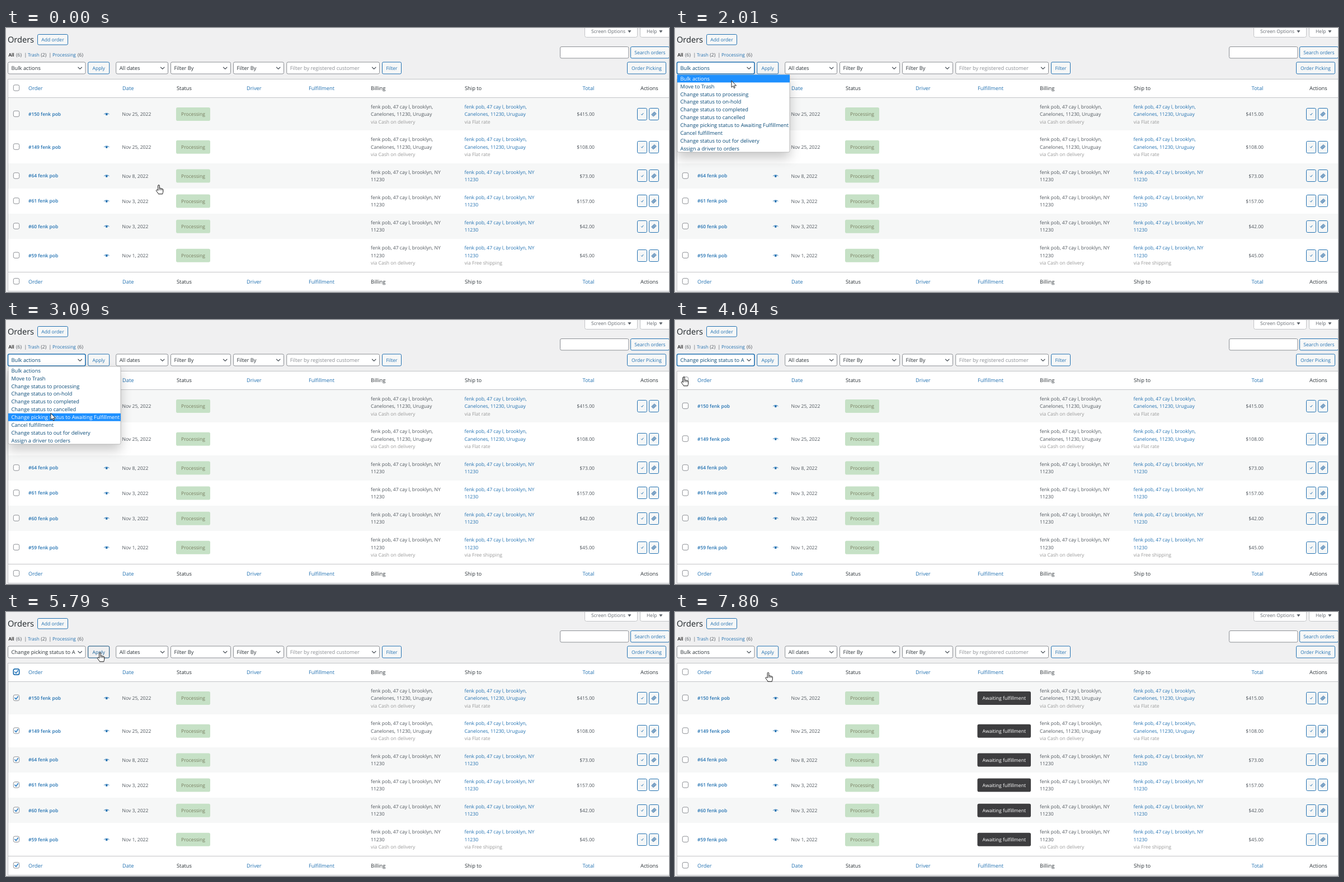
An HTML page that plays this animation: 1185x472 px, repeating every 8000 ms.

```html
<!DOCTYPE html>
<html lang="en">
<head>
<meta charset="utf-8">
<title>Orders</title>
<style>
  html, body { margin: 0; width: 100%; height: 100%; overflow: hidden; background: #f0f0f1; }
  svg { display: block; font-family: "Open Sans", "Noto Sans", sans-serif; text-rendering: geometricPrecision; }
  .popup { filter: drop-shadow(0 10px 10px rgba(0, 0, 0, .21)); }
</style>
</head>
<body>
<svg width="1185" height="472" viewBox="0 0 1185 472"><g id="page"></g><g id="live"></g></svg>
<script>
const LOOP = 8000, SMALL = 8.6, MEDIUM = 9.3;
const BLUE = '#2271b1', DARK = '#2c3338', GRAY = '#50575e', PALE = '#999', EDGE = '#8c8f94', LINE = '#c3c4c7';
const NAME = 'fenk pob', STREET = '47 cay l';
const BAR_Y = 61, BAR_H = 21;

const text = (x, y, str, fill = DARK, size = SMALL, extra = '') =>
  `<text x="${x}" y="${y}" fill="${fill}" font-size="${size}" ${extra}>${str}</text>`;
const rect = (x, y, w, h, fill, stroke = 'none', r = 0, width = 1) =>
  `<rect x="${x}" y="${y}" width="${w}" height="${h}" rx="${r}" fill="${fill}" stroke="${stroke}" stroke-width="${width}"/>`;
const path = (d, stroke, width = 1, fill = 'none') =>
  `<path d="${d}" fill="${fill}" stroke="${stroke}" stroke-width="${width}" stroke-linecap="round" stroke-linejoin="round"/>`;
const at = (x, y, inner) => `<g transform="translate(${x} ${y})">${inner}</g>`;

const button = (x, y, w, h, label, fill = '#f6f7f7', stroke = BLUE, width = 1) =>
  rect(x, y, w, h, fill, stroke, 2.2, width) +
  text(x + w / 2, y + h / 2 + 3.2, label, stroke === BLUE ? BLUE : '#135e96', SMALL, 'text-anchor="middle"');
const barButton = (x, w, label, ...style) => button(x, BAR_Y, w, BAR_H, label, ...style);
const select = (x, w, label, fill = DARK, stroke = EDGE, width = 1) =>
  rect(x, BAR_Y, w, BAR_H, '#fff', stroke, 2.5, width) + text(x + 6, 75, label, fill, MEDIUM) +
  path(`M${x + w - 13} 70.2l3.2 3.2 3.2-3.2`, '#50575e', 1.3);
const badge = (x, y, w, label, fill, color) =>
  rect(x, y - 12, w, 24, fill, 'none', 2.8) +
  text(x + w / 2, y + 3, label, color, SMALL, 'text-anchor="middle"');
const checkbox = (y, checked, focus) =>
  rect(13.3, y - 5.2, 10.4, 10.4, '#fff', focus ? BLUE : EDGE, 2.6, focus ? 1.8 : 1) +
  (checked ? path(`M15.9 ${y + .2}l2 2.3 3.5-4.8`, '#3582c4', 1.7) : '');

// Row: centre, number, date, total, far address?, billing note, shipping note
const CASH = 'via Cash on delivery';
const rows = [
  [153.8, 150, 'Nov 25, 2022', 415, true, CASH, 'via Flat rate'],
  [212.5, 149, 'Nov 25, 2022', 108, true, CASH, 'via Flat rate'],
  [264.4, 64, 'Nov 8, 2022', 73],
  [309.4, 61, 'Nov 3, 2022', 157],
  [354.5, 60, 'Nov 3, 2022', 42],
  [406.6, 59, 'Nov 1, 2022', 45, false, CASH, 'via Free shipping'],
];
const rowTops = [124, 183, 242, 287, 332, 377, 436];
const heads = [[40, 'Order', BLUE], [208, 'Date', BLUE], [305, 'Status'], [430, 'Driver', BLUE],
  [541, 'Fulfillment', BLUE], [652, 'Billing'], [820, 'Ship to'], [1030.5, 'Total', BLUE], [1134, 'Actions']];
const headRow = y => heads.map(([x, label, color]) => text(x, y, label, color, MEDIUM)).join('');

function address(x, c, far, note, color) {
  const lines = far
    ? [`${NAME}, ${STREET}, brooklyn,`, 'Canelones, 11230, Uruguay']
    : [`${NAME}, ${STREET}, brooklyn, NY`, '11230'];
  if (note) lines.push(note);
  const top = c + 3.2 - (lines.length - 1) * 6.75;
  return lines.map((s, i) => text(x, top + i * 13.5, s, i === 2 ? PALE : color)).join('');
}

const eye = path('M-4.3-.4Q0-3.6 4.3-.4', BLUE, .9) + `<circle cy=".2" r="1.9" fill="${BLUE}"/>`;
const tag = '<g transform="rotate(-42)">' + rect(-3.6, -2.4, 7.2, 4.8, '#9dbbd6', '#3f78ab', .8, .9) +
  path('M-2-.8H2M-2 .9H2', '#3f78ab', .7) + '</g>';

function row([c, number, date, total, far, bill, ship], i) {
  const top = Math.round(c) - 10.5;
  return rect(4, rowTops[i], 1181, rowTops[i + 1] - rowTops[i], i % 2 ? '#fff' : '#f6f7f7') +
    text(40, c + 3, `#${number} ${NAME}`, BLUE, 8.45, 'font-weight="600"') +
    at(179.8, c + .4, eye) +
    text(207.5, c + 3.6, date, GRAY) +
    badge(304, c + .2, 61, 'Processing', '#c6e1c6', '#777c5f') +
    address(652, c, far, bill, GRAY) + address(819.5, c, far, ship, BLUE) +
    text(1052, c + 3.6, `$${total}.00`, GRAY, SMALL, 'text-anchor="end"') +
    rect(1128.5, top, 17, 21, '#f6f7f7', BLUE, 2.2) + rect(1149.5, top, 17, 21, '#f6f7f7', BLUE, 2.2) +
    path(`M1135.4 ${c + .4}l1.3 1.4 2.3-3.2`, BLUE, 1) + at(1158, c + .2, tag);
}

const tab = (x, w, label, arrow) => rect(x, -5, w, 21.5, '#fff', LINE, 3) +
  text(x + 11.5, 9, label, '#646970') + path(`M${arrow} 4.6h5l-2.5 3.4z`, '#50575e', .5, '#50575e');

document.getElementById('page').innerHTML =
  tab(1034.5, 94, 'Screen Options', 1112) + tab(1133.5, 60, 'Help', 1168) +
  text(3, 26, 'Orders', '#1d2327', 14.6) + button(56.5, 11.5, 54, 18.5, 'Add order') +
  text(4.5, 51, 'All', '#111', 8.4, 'font-weight="600"') + text(18, 51, '(6)', GRAY) + text(32.5, 51, '|', GRAY) +
  text(39, 51, 'Trash', BLUE, 8.2) + text(62.3, 51, '(2)', GRAY) + text(76.5, 51, '|', GRAY) +
  text(83, 51, 'Processing', BLUE, 8.4) + text(128, 51, '(6)', GRAY) +
  rect(990.5, 33.5, 122.5, 20.5, '#fff', EDGE, 2.5) +
  button(1116.5, 33.5, 69, 20.5, 'Search orders') + barButton(1110.5, 69, 'Order Picking') +
  select(196.7, 92.8, 'All dates') + select(294.5, 107, 'Filter By') + select(406.5, 90, 'Filter By') +
  rect(3.5, 91.5, 1190, 379, '#fff', LINE) + headRow(111) + rows.map(row).join('') +
  path('M4 124.5H1185M4 436.5H1185', LINE) + headRow(457);

const options = ['Bulk actions', 'Move to Trash', 'Change status to processing', 'Change status to on-hold',
  'Change status to completed', 'Change status to cancelled', 'Change picking status to Awaiting Fulfillment',
  'Cancel fulfillment', 'Change status to out for delivery', 'Assign a driver to orders'];
const PITCH = 13.9, LIST_TOP = 83.5;

function popup(cursorY) {
  const picked = Math.max(0, Math.floor((cursorY - LIST_TOP) / PITCH));
  return `<g class="popup">${rect(4, 83, 201, 139, '#fff', '#a5a5a5', 2.5, .7)}</g>` +
    rect(4, LIST_TOP + picked * PITCH, 201, PITCH, '#1e90ff') +
    options.map((s, i) => text(9.5, LIST_TOP + i * PITCH + 10.2, s, i === picked ? '#fff' : '#0a4b78', MEDIUM)).join('');
}

const hand = path('M-1.3 9.5V1.5a1.3 1.3 0 0 1 2.6 0V6.3c.6-.9 2.3-.6 2.4.4.6-.7 2-.4 2.2.5.8-.5 1.9 0 1.9 1.2' +
  'V11.5c0 2.5-1 3.3-1 4.8H-.6c0-1.3-3.2-4.2-4-6.2-.3-1.2 1.6-2 2.4-.9z', '#111', 1, '#fff') +
  path('M1.3 6.5V9.3M3.7 7V9.3M5.9 7.5V9.3', '#111', .8);
const arrow = path('M0 0V11.5L2.7 9 4.6 13 6.3 12.2 4.5 8.4H8.2Z', '#111', .9, '#fff');

// Move: start, steps, shape, points spread evenly over the steps
const moves = [
  [0, 1, hand, [273, 280.5]],
  [720, 7, hand, [266, 270], [195, 165], [122, 90], [112, 71]],
  [1610, 1, arrow, [112, 71]],
  [1940, 10, arrow, [105.5, 82], [92, 120], [83, 156], [75, 168]],
  [3090, 1, arrow, [80, 167]],
  [3230, 1, hand, [80, 168]],
  [3690, 6, hand, [84, 168], [45, 126], [16, 101.5]],
  [5230, 7, arrow, [55.5, 89.5], [110, 87], [143, 84]],
  [5710, 2, hand, [160, 76], [168, 72.5]],
  [6530, 2, hand, [168, 92], [166.5, 108]],
];
const STEP = 68;

function cursor(t) {
  const [start, steps, shape, ...points] = moves.findLast(m => t >= m[0]);
  const step = Math.min(steps - 1, Math.floor((t - start) / STEP));
  const pos = steps > 1 ? step / (steps - 1) * (points.length - 1) : 0;
  const i = Math.floor(pos), a = points[i], b = points[i + 1] || a;
  const [x, y] = a.map((v, k) => v + (b[k] - v) * (pos - i));
  return { x, y, shape };
}

function scene(t) {
  const during = (from, to) => t >= from && t < to;
  const { x, y, shape } = cursor(t);
  const focused = during(1410, 4440), reloaded = t >= 7660;
  const checked = during(4630, 7660), headChecked = during(4440, 7660);
  const label = during(3230, 7660) ? 'Change picking status to A' : 'Bulk actions';
  const labelColor = focused ? '#0a4b78' : during(1070, 1410) ? BLUE : DARK;
  const hover = during(5710, 6530), applyFocus = during(6060, 7660);

  let out = select(3.5, 138.5, label, labelColor, focused ? BLUE : EDGE, focused ? 1.6 : 1) +
    barButton(146.7, 38, 'Apply', during(6060, 6270) ? '#e8eaeb' : hover ? '#f0f0f1' : '#f6f7f7',
      applyFocus ? '#3582c4' : hover ? '#0a4b78' : BLUE, applyFocus ? 1.6 : 1);

  // The customer field is a bare select until the page finishes loading.
  out += during(7660, 7800)
    ? select(501.7, 28, '') + barButton(535, 34, 'Filter')
    : select(501.7, 165.8, 'Filter by registered customer', EDGE) + barButton(672.5, 34, 'Filter');

  out += checkbox(107, headChecked, during(4440, 6060)) + checkbox(452.8, checked);
  for (const [c] of rows) {
    out += checkbox(c - .4, checked);
    if (reloaded) out += badge(540.5, c + .2, 95.5, 'Awaiting fulfillment', '#3d3d3f', '#fff');
  }
  if (during(5230, 5360) || during(6530, 7660)) out += path('M69.8 109h4.6l-2.3-3z', DARK, .6, DARK);
  if (during(1480, 3230)) out += popup(y);
  return out + at(x, y, shape);
}

const live = document.getElementById('live');
let shown = '';
function frame(now) {
  const next = scene(now % LOOP);
  if (next !== shown) live.innerHTML = shown = next;
  requestAnimationFrame(frame);
}
requestAnimationFrame(frame);
</script>
</body>
</html>
```
